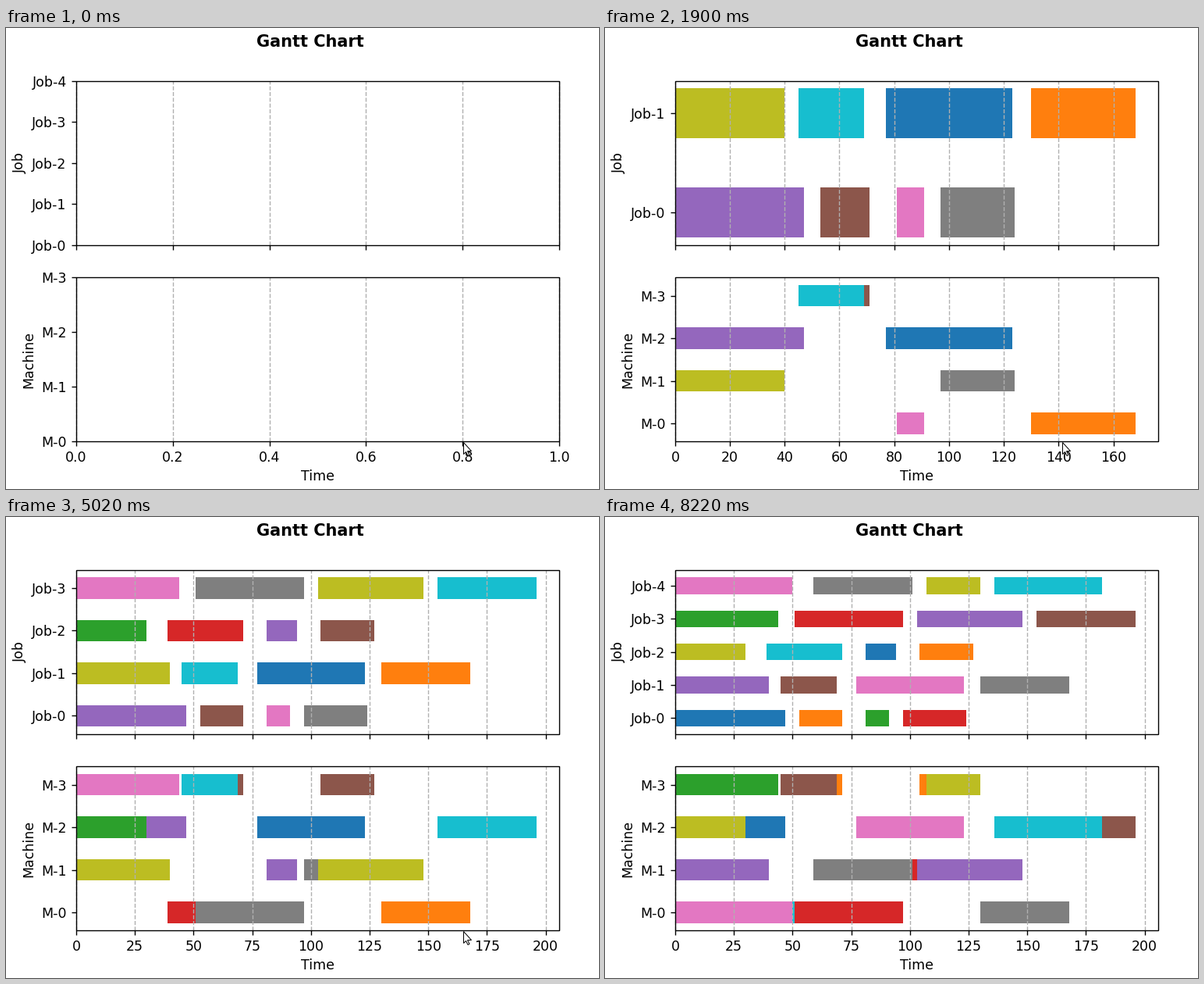
A matplotlib script for the animation above (8.63 s loop, 760 px wide and 590 px high).

```python
import numpy as np
import matplotlib.pyplot as plt
from matplotlib.animation import FuncAnimation
from matplotlib.collections import LineCollection, PolyCollection
from matplotlib.patches import Polygon, Rectangle

W, H, DPI = 760, 590, 125
LOOP, STEP = 8630, 10
PT = DPI / 72

# Panel edges in stage pixels, y pointing down
LEFT, RIGHT = 89.875, 709.1
JOB_PANEL = (67.88, 277.53)
MACHINE_PANEL = (319.46, 529.11)
PAD = 7 * PT
TICK_LEFT, TICK_DOWN = 0, 3

# Each job: (machine, start, end) of its operations
JOBS = [
    [(2, 0, 47), (3, 53, 71), (0, 81, 91), (1, 97, 124)],
    [(1, 0, 40), (3, 45, 69), (2, 77, 123), (0, 130, 168)],
    [(2, 0, 30), (0, 39, 71), (1, 81, 94), (3, 104, 127)],
    [(3, 0, 44), (0, 51, 97), (1, 103, 148), (2, 154, 196)],
    [(0, 0, 50), (1, 59, 101), (3, 107, 130), (2, 136, 182)],
]
SCENE_STARTS = [0, 840, 1900, 3900, 5020, 5950]
CURSOR_STARTS = [0, 7980, 8100, 8220]
CURSOR_TIPS = [(586.5, 530.5), (585.5, 519.5), (583.5, 498.5), None]
ARROW = np.array([(0, 0), (0, 15), (3, 12), (5.5, 17),
                  (7.5, 16), (5, 11), (10, 11)])

plt.rcParams["font.family"] = "DejaVu Sans"
fig = plt.figure(figsize=(W / DPI, H / DPI), dpi=DPI, facecolor="white")
ax = fig.add_axes([0, 0, 1, 1])
ax.set_xlim(0, W)
ax.set_ylim(H, 0)
ax.set_autoscale_on(False)
ax.axis("off")


def label(x, y, text, ha="center", va="top", **kw):
    kw.setdefault("fontsize", 10)
    return ax.text(x, y, text, ha=ha, va=va, color="black", zorder=3, **kw)


def ticks(xs, ys, marker):
    return ax.plot(xs, ys, ls="", marker=marker, ms=3.5, mew=0.8,
                   color="black", zorder=2, clip_on=False)[0]


def row_y(panel, pos, rows):
    """Pixel height of a row; bars are 0.5 tall with 5% margins."""
    top, bottom = panel
    share = ((pos + 0.25) / (rows - 0.5) + 0.05) / 1.1
    return bottom - (bottom - top) * share


def bar(panel, row, rows, x0, x1):
    y0, y1 = (row_y(panel, row + d, rows) for d in (-0.25, 0.25))
    return [(x0, y0), (x1, y0), (x1, y1), (x0, y1)]


def build_scene(count):
    """All artists of the chart showing the first `count` jobs."""
    parts = []
    if count:
        end = 1.05 * max(op[2] for job in JOBS[:count] for op in job)
        gap = 20 if end < 200 else 25
        values = np.arange(0, end, gap)
        names = [f"{v:.0f}" for v in values]
    else:
        end = 1.0
        values = np.linspace(0, 1, 6)
        names = [f"{v:.1f}" for v in values]

    def to_x(v):
        return LEFT + (RIGHT - LEFT) * v / end

    xs = to_x(values)
    for panel in (JOB_PANEL, MACHINE_PANEL):
        top, bottom = panel
        grid = LineCollection([[(x, bottom), (x, top)] for x in xs],
                              colors="#b0b0b0", linewidths=0.8,
                              linestyles="--", zorder=1.5)
        parts.append(ax.add_collection(grid, autolim=False))
        parts.append(ticks(xs, np.full(len(xs), bottom), TICK_DOWN))
    for x, name in zip(xs, names):
        parts.append(label(x, MACHINE_PANEL[1] + PAD, name))

    for panel, rows, prefix in ((JOB_PANEL, count or 5, "Job"),
                                (MACHINE_PANEL, 4, "M")):
        if count:
            ys = [row_y(panel, i, rows) for i in range(rows)]
        else:
            ys = np.linspace(panel[1], panel[0], rows)
        parts.append(ticks(np.full(rows, LEFT), ys, TICK_LEFT))
        for i, y in enumerate(ys):
            parts.append(label(LEFT - PAD, y, f"{prefix}-{i}",
                               ha="right", va="center_baseline"))

    # The colour cycle carries on from one chart to the next
    shade = 2 * count * (count - 1)
    bars, colors = [], []
    for j, job in enumerate(JOBS[:count]):
        for machine, start, stop in job:
            span = to_x(start), to_x(stop)
            bars.append(bar(JOB_PANEL, j, count, *span))
            bars.append(bar(MACHINE_PANEL, machine, 4, *span))
            colors += [f"C{shade % 10}"] * 2
            shade += 1
    if bars:
        poly = PolyCollection(bars, facecolors=colors, edgecolors="none",
                              linewidths=0, zorder=1)
        parts.append(ax.add_collection(poly, autolim=False))
    return parts


def build_frame():
    for top, bottom in (JOB_PANEL, MACHINE_PANEL):
        ax.add_patch(Rectangle((LEFT, top), RIGHT - LEFT, bottom - top,
                               fill=False, ec="black", lw=0.8, zorder=2.5))
    label(389.5, 7.98, "Gantt Chart", fontsize=12, fontweight="bold")
    label((LEFT + RIGHT) / 2, 565.2, "Time")
    for x, panel, text in ((26.7, JOB_PANEL, "Job"),
                           (38.5, MACHINE_PANEL, "Machine")):
        label(x, sum(panel) / 2, text, va="bottom", rotation=90,
              rotation_mode="anchor")
    ax.plot([0, W], [589.5, 589.5], color="#8c8c8c", lw=1 / PT)


def index_at(starts, t):
    return int(np.searchsorted(starts, t, side="right")) - 1


build_frame()
scenes = [build_scene(n) for n in range(len(JOBS) + 1)]
cursor = ax.add_patch(Polygon(ARROW, fc="white", ec="black", lw=1 / PT,
                              joinstyle="miter", zorder=5))


def update(frame):
    t = frame * STEP
    current = index_at(SCENE_STARTS, t)
    for i, parts in enumerate(scenes):
        for part in parts:
            part.set_visible(i == current)
    tip = CURSOR_TIPS[index_at(CURSOR_STARTS, t)]
    cursor.set_visible(tip is not None)
    if tip:
        cursor.set_xy(ARROW + tip)
    return []


def reset():
    return update(0)


anim = FuncAnimation(fig, update, frames=LOOP // STEP, init_func=reset,
                     interval=STEP, repeat=True, repeat_delay=0,
                     cache_frame_data=False)
plt.show()
```
